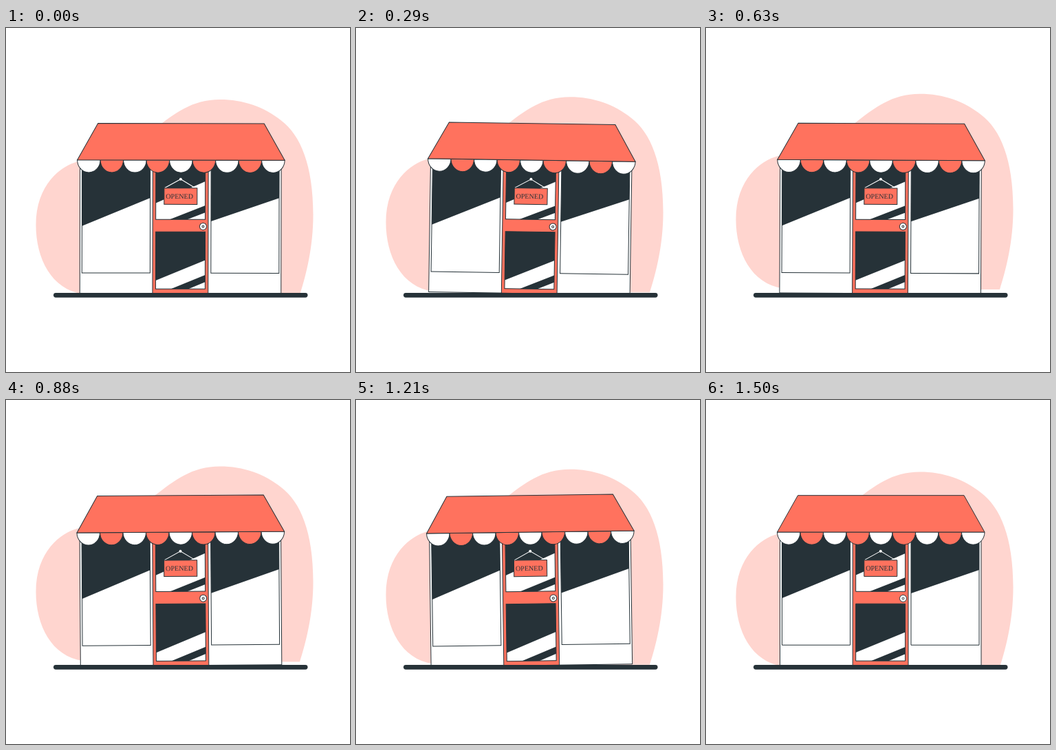
An HTML page with a canvas that plays this animation: 500 px wide and 500 px high, repeating every 1.54 s.

```html
<!DOCTYPE html>
<html lang="en">
<head>
<meta charset="utf-8">
<title>Shop front</title>
<style>
html, body { margin: 0; width: 100%; height: 100%; overflow: hidden; background: #fff; }
canvas { display: block; width: 500px; height: 500px; }
</style>
</head>
<body>
<canvas id="stage"></canvas>
<script>
const LOOP = 1540, STEPS = 37, STEP_MS = 1000 / 24;
const CORAL = '#ff725e', PALE = '#ffd5cf', DARK = '#263238', WHITE = '#fff';
const PIVOT = { x: 254, y: 262 };

const canvas = document.getElementById('stage');
const ratio = window.devicePixelRatio || 1;
canvas.width = canvas.height = 500 * ratio;
const ctx = canvas.getContext('2d');

function paint(fill, stroke, width = 1) {
  if (fill) { ctx.fillStyle = fill; ctx.fill(); }
  if (stroke) { ctx.strokeStyle = stroke; ctx.lineWidth = width; ctx.stroke(); }
}

function polygon(points, fill, stroke) {
  ctx.beginPath();
  points.forEach(([x, y]) => ctx.lineTo(x, y));
  ctx.closePath();
  paint(fill, stroke);
}

function box(left, top, right, bottom, fill, stroke) {
  ctx.beginPath();
  ctx.rect(left, top, right - left, bottom - top);
  paint(fill, stroke);
}

function circle(x, y, r, fill, stroke, width) {
  ctx.beginPath();
  ctx.arc(x, y, r, 0, Math.PI * 2);
  paint(fill, stroke, width);
}

function drawBlob(lift) {
  ctx.save();
  ctx.translate(0, -lift);
  ctx.beginPath();
  ctx.moveTo(104, 194.8);
  ctx.bezierCurveTo(80, 201, 43.5, 228, 43.5, 287);
  ctx.bezierCurveTo(43.5, 335, 66, 381, 112, 387);
  ctx.lineTo(140, 388.6);
  ctx.lineTo(427, 388.6);
  ctx.bezierCurveTo(436, 360, 446.5, 320, 446.5, 272);
  ctx.bezierCurveTo(446.5, 200, 428, 156, 400, 135);
  ctx.bezierCurveTo(375, 115, 345, 104.5, 311, 104.5);
  ctx.bezierCurveTo(270, 104.5, 245, 125, 217, 146.4);
  ctx.lineTo(190, 180);
  ctx.closePath();
  paint(PALE);
  ctx.restore();
}

function drawWindow(left, right, shadeLeft, shadeRight) {
  box(left, 193, right, 356.2, WHITE);
  polygon([[left, 193], [right, 193], [right, shadeRight], [left, shadeLeft]], DARK);
  box(left, 193, right, 356.2, null, DARK);
}

// Dark glass with a wide reflection crossed by one dark stripe.
function drawDoorGlass(top, bottom, shineLeft, shineRight, stripeX) {
  const left = 217.7, right = 289.6;
  box(left, top, right, bottom, DARK);
  polygon([[left, shineLeft], [right, shineRight], [right, bottom], [left, bottom]], WHITE);
  polygon([[stripeX, bottom], [right, bottom - 20.3], [right, bottom - 10], [stripeX + 25.5, bottom]], DARK);
  box(left, top, right, bottom, null, DARK);
}

function drawSign() {
  ctx.beginPath();
  ctx.moveTo(230.5, 232.5);
  ctx.lineTo(253.8, 219.7);
  ctx.lineTo(274.5, 232.2);
  paint(null, WHITE);
  circle(253.8, 219.7, 2, WHITE);
  box(229.8, 232.8, 277.8, 256.4, CORAL, DARK);
  ctx.fillStyle = DARK;
  ctx.font = '10.1px "Liberation Serif", serif';
  ctx.fillText('OPENED', 232.2, 248);
}

function drawAwning() {
  const left = 103.5, right = 405, edge = 192, count = 9;
  const width = (right - left) / count;
  for (let i = 0; i < count; i++) {
    ctx.beginPath();
    ctx.ellipse(left + width * (i + 0.5), edge, width / 2, 18.2, 0, 0, Math.PI);
    ctx.closePath();
    paint(i % 2 ? CORAL : WHITE, DARK);
  }
  polygon([[133.5, 138.7], [375, 138.7], [right, edge], [left, edge]], CORAL, DARK);
}

function drawShop(degrees) {
  ctx.save();
  ctx.translate(PIVOT.x, PIVOT.y);
  ctx.rotate(degrees * Math.PI / 180);
  ctx.translate(-PIVOT.x, -PIVOT.y);

  box(107.5, 192, 400, 385.8, WHITE, DARK);
  drawWindow(110.5, 209.6, 288, 247);
  drawWindow(298, 397, 281, 247);

  box(213.2, 192, 294, 385.8, CORAL, DARK);
  drawDoorGlass(193, 278.3, 254.5, 223, 238);
  drawDoorGlass(296.2, 379.2, 367, 337.5, 240);
  circle(286.5, 288.4, 5, WHITE, DARK);
  circle(286.5, 288.4, 1.5, WHITE, DARK);

  drawSign();
  drawAwning();
  ctx.restore();
}

function drawGround() {
  ctx.beginPath();
  ctx.roundRect(69, 385, 369.5, 6.7, 3.35);
  paint(DARK);
}

// Linear swing: 0, +1, 0, -1, 0 over one loop.
function swing(p) {
  if (p < 0.25) return 4 * p;
  return p < 0.75 ? 2 - 4 * p : 4 * p - 4;
}

function render(now) {
  const step = Math.min(STEPS - 1, Math.floor((now % LOOP + 5) / STEP_MS));
  const phase = (step + 1) / STEPS;
  ctx.setTransform(ratio, 0, 0, ratio, 0, 0);
  ctx.fillStyle = WHITE;
  ctx.fillRect(0, 0, 500, 500);
  drawBlob(10 * (1 - Math.abs(1 - 2 * phase)));
  drawShop(swing(phase));
  drawGround();
}

let start;
function tick(now) {
  start ??= now;
  render(now - start);
  requestAnimationFrame(tick);
}
render(0);
requestAnimationFrame(tick);
</script>
</body>
</html>
```
